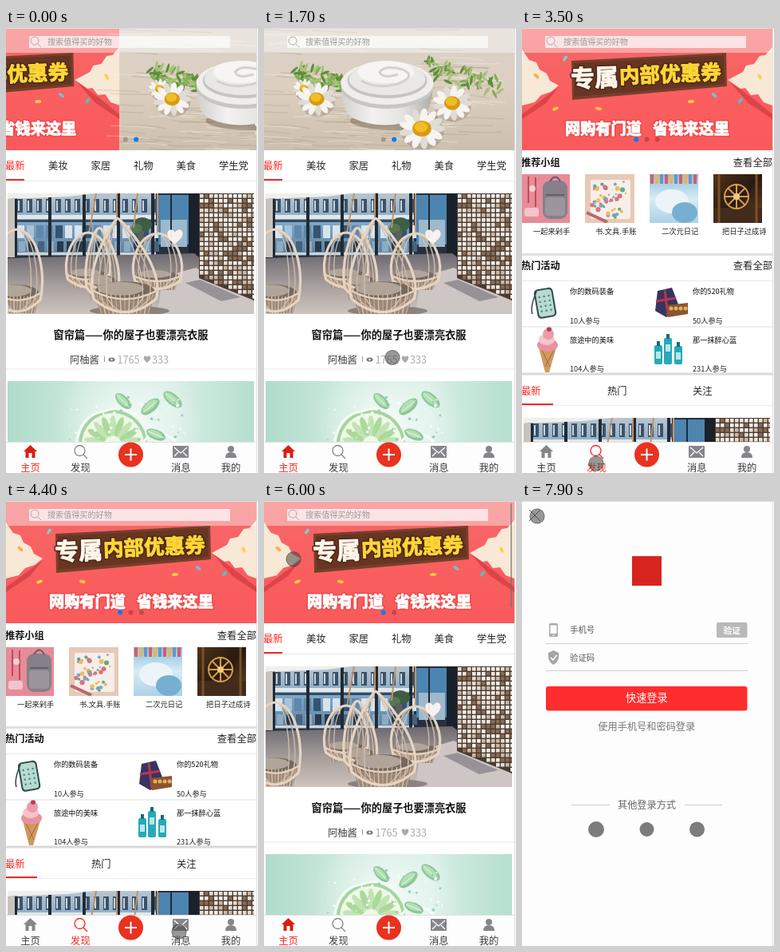
Write an HTML page with a canvas that moves like this. It is 316 px wide and 557 px high and loops after 8 s.

```html
<!DOCTYPE html>
<html lang="zh-CN">
<head>
<meta charset="utf-8">
<title>Shopping app</title>
<style>
html, body { margin: 0; width: 100%; height: 100%; overflow: hidden; background: #fff; }
canvas { display: block; width: 316px; height: 557px; }
</style>
</head>
<body>
<canvas id="stage"></canvas>
<script>
const W = 316, H = 557, LOOP = 8000, PW = 314;
const FONT = '"Noto Sans CJK SC", "Noto Sans CJK", "Noto Sans", sans-serif';
const RED = '#f8281e', INK = '#222', ICON = '#85858a';
const cv = document.getElementById('stage');
const dpr = window.devicePixelRatio || 1;
cv.width = W * dpr;
cv.height = H * dpr;
const c = cv.getContext('2d');

// ---- helpers ----
function rect(x, y, w, h, fill) {
  c.fillStyle = fill;
  c.fillRect(x, y, w, h);
}
function round(x, y, w, h, r, fill) {
  c.beginPath();
  c.roundRect(x, y, w, h, r);
  c.fillStyle = fill;
  c.fill();
}
function oval(x, y, rx, ry, fill, rot = 0) {
  c.beginPath();
  c.ellipse(x, y, rx, ry, rot, 0, 7);
  c.fillStyle = fill;
  c.fill();
}
const dot = (x, y, r, fill) => oval(x, y, r, r, fill);
function poly(d, fill) {
  c.fillStyle = fill;
  c.fill(new Path2D(d));
}
function line(d, color, w = 1) {
  c.strokeStyle = color;
  c.lineWidth = w;
  c.stroke(new Path2D(d));
}
function text(s, x, y, size, color = INK, weight = 400, align = 'left') {
  c.font = `${weight} ${size}px ${FONT}`;
  c.textAlign = align;
  c.textBaseline = 'middle';
  c.fillStyle = color;
  c.fillText(s, x, y);
}
function heavy(s, x, y, size, color, edge) {
  c.lineJoin = 'round';
  text(s, x, y, size, color, 900);
  c.strokeStyle = edge;
  c.lineWidth = 4;
  c.strokeText(s, x, y);
  c.strokeStyle = color;
  c.lineWidth = 1;
  c.strokeText(s, x, y);
  c.fillText(s, x, y);
  c.lineJoin = 'miter';
}
function grad(x0, y0, x1, y1, ...stops) {
  const g = c.createLinearGradient(x0, y0, x1, y1);
  stops.forEach((s, i) => g.addColorStop(i / (stops.length - 1), s));
  return g;
}
function clip(x, y, w, h, draw) {
  c.save();
  c.beginPath();
  c.rect(x, y, w, h);
  c.clip();
  draw();
  c.restore();
}
function shift(x, y, draw) {
  c.save();
  c.translate(x, y);
  draw();
  c.restore();
}
function seeded(seed) {
  return () => (seed = (seed * 16807) % 2147483647) / 2147483647;
}

// ---- banners ----
function couponBanner() {
  rect(0, 0, PW, 153, grad(0, 0, 0, 153, '#f4696a', '#fb5f60', '#f95a5b'));
  const paper = '#f8e8d6';
  poly('M0 108 L22 92 46 74 30 94 0 114Z M314 108 L292 90 259 66 284 94 314 114Z', '#dc4449');
  poly('M0 27 L9 40 18 43 22 52 31 57 35 66 46 72 36 80 24 84 16 93 0 97Z', paper);
  poly('M314 24 L305 34 298 35 291 45 281 47 277 55 258 65 274 76 280 75 287 84 296 83 303 93 314 97Z', paper);
  poly('M62 41 L256 31 257 73 63 90Z', '#75402c');
  poly('M65 44 L253 34 254 70 66 86Z', '#673521');
  c.save();
  c.translate(61, 63);
  c.rotate(-.04);
  heavy('专属', 0, 0, 30, '#fff7ea', '#4d2618');
  heavy('内部优惠券', 61, -1, 25.6, '#ffd735', '#4d2618');
  c.restore();
  heavy('网购有门道', 54, 126, 19.2, '#fff', '#f0484a');
  heavy('省钱来这里', 164, 126, 19.2, '#fff', '#f0484a');
  [[42, 101, '#ffcf3c'], [54, 38, '#7ad0c8'], [212, 92, '#ffcf3c'], [241, 84, '#6fc0d8'],
   [274, 91, '#5bbcc0'], [298, 61, '#ffd14a'], [96, 101, '#f8c042'], [18, 60, '#f8b04a']]
    .forEach(([x, y, f]) => oval(x, y, 2, 4, f, x));
}
function daisy(x, y, r) {
  oval(x + 1, y + 4, r * .95, r * .8, 'rgba(110,90,65,.25)');
  for (let i = 0; i < 13; i++) {
    const a = i * Math.PI / 6.5;
    oval(x + Math.cos(a) * r * .66, y + Math.sin(a) * r * .55, r * .37, r * .17, i % 3 ? '#f6f4f0' : '#dfdcd6', a);
  }
  oval(x, y, r * .42, r * .36, '#d99a12');
  oval(x - 1, y - 2, r * .3, r * .23, '#f0bd24');
}
// A bunch of fine leaves around a slanted stem.
function sprig(x, y, w, h, seed) {
  const r = seeded(seed);
  for (let i = 0; i < 55; i++) {
    const k = r();
    oval(x + k * w, y + k * h + (r() - .5) * 22, 6, 1.7, ['#5f8f3c', '#86ad58', '#a9c07c'][i % 3], r() * 3 - 1.5);
  }
}
function creamBanner() {
  rect(0, 0, PW, 153, grad(0, 0, 0, 153, '#d9d2c8', '#dccfc0', '#cdbfae'));
  const r = seeded(11);
  for (let i = 0; i < 110; i++) {
    const y = r() * 153, x = r() * 280 - 30;
    line(`M${x} ${y} q25 ${r() * 6 - 3} 55 ${r() * 4}`, i % 2 ? 'rgba(140,118,95,.2)' : 'rgba(255,248,238,.3)', 1.3);
  }
  sprig(38, 55, 60, 14, 3);
  sprig(206, 50, 90, 24, 8);
  oval(166, 116, 58, 12, 'rgba(95,75,55,.4)');
  poly('M97 72 Q97 105 112 113 Q150 130 196 113 Q211 104 212 70Z', grad(97, 0, 212, 0, '#d2d0cd', '#f3f2f0', '#e6e4e1', '#aeaaa5'));
  oval(154.5, 74, 58, 27, '#c9c6c2');
  oval(154.5, 69, 58, 27, '#efeeec');
  oval(154.5, 66, 50, 22, '#c4c4c3');
  oval(154.5, 64, 48, 20, '#e9e8e6');
  oval(153, 55, 36, 14, '#f6f5f4');
  line('M122 66 Q140 77 168 70 Q192 60 174 52 Q152 46 145 55 Q148 64 168 58', '#d2d2d1', 3);
  daisy(50, 76, 13);
  daisy(66, 89, 23);
  daisy(236, 94, 24);
  daisy(198, 126, 28);
}
function bannerArea(offset, n, active) {
  clip(0, 1, PW, 152, () => {
    if (offset < PW) shift(-offset, 0, couponBanner);
    if (offset > 0) shift(PW - offset, 0, creamBanner);
    rect(0, 1, PW, 30, 'rgba(255,255,255,.4)');
  });
  rect(29, 10, 252, 15, 'rgba(255,255,255,.7)');
  line('M41 16a5 5 0 1 1-10 0a5 5 0 1 1 10 0M40 20l4 4', '#aaa', 1);
  text('搜索值得买的好物', 52, 17, 10.1, '#9a9a9a');
  for (let i = 0; i < n; i++)
    dot(156.5 + (i - (n - 1) / 2) * 13.4, 139.5, 3, i === active ? '#087cf5' : 'rgba(0,0,0,.22)');
}

// ---- photos ----
// A hanging wicker chair; belly sets how far the sides bulge.
function chair(x, top, bot, w, belly, lean = 0) {
  const h = bot - top, seat = bot - h * .24, ax = x - lean;
  const shell = k => `M${ax} ${top} C${ax + w * belly * k} ${top + 2} ${x + w * .6 * k} ${top + h * .5} ${x + w * .47 * k} ${bot - h * .16} Q${x} ${bot + h * .12} ${x - w * .47 * k} ${bot - h * .16} C${x - w * .6 * k} ${top + h * .5} ${ax - w * belly * k} ${top + 2} ${ax} ${top}`;
  poly(`M${x - w * .47} ${seat} H${x + w * .47} L${x + w * .36} ${bot} H${x - w * .36}Z`, '#9a8779');
  oval(x, seat, w * .44, h * .1, '#75695f');
  oval(x - w * .06, seat - 3, w * .34, h * .07, '#b1a59a');
  for (let i = -6; i <= 6; i++)
    line(`M${x + i * w * .07} ${seat + 4} L${x + i * w * .058} ${bot}`, i % 2 ? '#d9c5b2' : '#c0a993', 1.4);
  line(shell(.78), '#cdb49d', 1.6);
  line(shell(.55), '#d8c3af', 1.2);
  line(shell(1), '#e6d4c2', 3.2);
  line(`M${x - w * .47} ${seat} Q${x} ${seat + h * .17} ${x + w * .47} ${seat}`, '#e2cfbc', 2.6);
}
function loungePhoto() {
  clip(2, 207, 309, 151, () => {
    const r = seeded(29);
    const pick = list => list[Math.floor(r() * list.length)];
    rect(2, 207, 309, 151, '#27303c');
    // street seen through the glass front
    rect(12, 207, 176, 78, grad(0, 207, 0, 285, '#b9c6cf', '#7fa5c4', '#5b7f9f'));
    for (let x = 14; x < 186; x += 12) {
      rect(x, 214, 7, 17, '#3e5267');
      rect(x + 1, 216, 2, 13, '#c8d6e0');
      rect(x, 247, 9, 16, pick(['#d7e4ec', '#5f88aa', '#345470', '#a7c3d7']));
      rect(x + 2, 267, 8, 13, pick(['#29394a', '#46637e', '#8dabc2']));
    }
    rect(12, 234, 176, 5, '#e3e7e8');
    rect(12, 240, 176, 3, '#334b63');
    rect(12, 281, 176, 3, '#cfd4d6');
    for (let i = 0; i < 5; i++) rect(10 + i * 43, 207, 4, 82, '#212a35');
    poly('M2 207 H110 L78 211 2 214Z', '#efefec');
    rect(2, 214, 9, 73, '#c8c3bd');
    rect(191, 209, 38, 62, '#4d84b0');
    rect(194, 240, 33, 34, '#9db9cb');
    rect(206, 207, 2, 72, '#1e2934');
    rect(229, 207, 13, 111, '#1a212b');
    // floor
    poly('M2 288 L236 282 311 342 311 358 2 358Z', grad(0, 283, 0, 358, '#6d6a70', '#a59d9c', '#cfc3bc'));
    poly('M196 312 L238 300 311 341 311 358 190 358Z', '#cdc6c4');
    poly('M225 319 L243 315 294 337 270 342Z', '#989197');
    oval(171, 246, 12, 9, '#3f5d43');
    oval(164, 251, 7, 6, '#567651');
    rect(165, 254, 8, 28, '#5a6159');
    // tiled wall
    poly('M242 207 H311 V341 L242 313Z', '#4a3a31');
    for (let x = 243; x < 311; x += 6)
      for (let y = 208; y < 309 + (x - 242) * .4; y += 6)
        rect(x, y, 4.6, 4.6, pick(['#f6f0e9', '#e6dccf', '#c9b7a4', '#846a55', '#f0e8de']));
    oval(155, 354, 50, 6, 'rgba(60,52,52,.45)');
    line('M139 207V240M113 207L104 257M165 207L160 250M190 207V258', '#c39468', 2);
    chair(103, 256, 326, 54, .4);
    chair(190, 257, 328, 60, .4);
    chair(14, 252, 357, 62, .4);
    chair(121, 250, 340, 42, .2, 4);
    chair(149, 238, 358, 84, .06, 9);
    poly('M212 270 C193 257 207 247 212 256 C217 247 231 257 212 270', 'rgba(255,246,244,.93)');
  });
}
function leaf(x, y, rot, s) {
  oval(x, y, 14 * s, 7 * s, '#8cc896', rot);
  oval(x - 1, y - 1, 11 * s, 4.5 * s, '#b3dfb4', rot);
  const dx = Math.cos(rot) * 12 * s, dy = Math.sin(rot) * 12 * s;
  line(`M${x - dx} ${y - dy}L${x + dx} ${y + dy}`, '#e9f7ea', 1);
}
function limePhoto() {
  clip(2, 442, 309, 80, () => {
    rect(2, 442, 309, 80, grad(2, 0, 311, 0, '#b0dbcb', '#cdeade', '#d7eee5', '#b5dfcf'));
    const g = c.createRadialGradient(155, 498, 5, 155, 498, 95);
    g.addColorStop(0, 'rgba(255,255,255,.75)');
    g.addColorStop(1, 'rgba(255,255,255,0)');
    rect(2, 442, 309, 80, g);
    dot(134, 521, 43, '#a4d59f');
    dot(134, 521, 39, '#eef8e6');
    for (let i = 0; i < 9; i++) {
      const a = Math.PI + (i + .5) * Math.PI / 9;
      oval(134 + Math.cos(a) * 23, 521 + Math.sin(a) * 23, 13, 4.2, i % 2 ? '#abd99c' : '#c2e4b3', a);
    }
    line('M88 521Q93 484 122 480Q150 470 168 489M171 521Q183 498 206 512L216 521', '#f3fcf7', 3);
    leaf(147, 467, .8, .9);
    leaf(181, 474, -.7, 1);
    leaf(209, 465, .7, 1);
    leaf(188, 509, .4, .9);
    const r = seeded(7);
    for (let i = 0; i < 50; i++) dot(80 + r() * 150, 462 + r() * 58, .5 + r() * 1.4, i % 3 ? '#f5fffa' : '#9bcfbb');
  });
}

// ---- shared parts ----
function frame(bg) {
  rect(0, 0, W, H, '#fff');
  rect(0, 0, PW, H, bg);
}
function edges() {
  rect(0, 0, W, 1, '#ddd');
  rect(314, 0, 1, H, '#dedede');
}
function nav(active) {
  rect(0, 519, PW, 38, '#fdfdfd');
  rect(0, 518, PW, 1, '#e2e2e2');
  const col = i => i === active ? RED : ICON;
  poly('M30.5 522 L39 530 H36.5 V538 H32.5 V532 H28.5 V538 H24.5 V530 H22Z', active === 0 ? '#d91e13' : ICON);
  line('M99 529a6.5 6.5 0 1 1-13 0a6.5 6.5 0 1 1 13 0M97 534l5 5', col(1), 1.3);
  dot(156.5, 534, 15.5, '#e9321f');
  line('M149 534H164M156.5 526.5V541.5', '#fff', 2);
  round(209, 523, 20, 15, 1, ICON);
  line('M211 525L219 532L227 525M211 536L216 531M227 536L222 531', '#fff', 1.3);
  dot(282, 527, 4, ICON);
  poly('M275 538 Q275 531 282 531 Q289 531 289 538Z', ICON);
  ['主页', '发现', 0, '消息', '我的'].forEach((s, i) => {
    if (s) text(s, 30.5 + i * 62.9, 550.3, 12.3, i === active ? RED : '#3b3b3b', 400, 'center');
  });
}
function scrollbar(h, alpha) {
  if (alpha > 0) rect(309, 3, 2, h, `rgba(110,110,110,${.6 * alpha})`);
}

// ---- pages ----
function home(offset, active, bar) {
  frame('#fff');
  bannerArea(offset, 2, active);
  ['最新', '美妆', '家居', '礼物', '美食', '学生党'].forEach((s, i) =>
    text(s, i * 53.5 - (i ? .5 : 1), 172.5, 12.3, i ? INK : RED));
  rect(0, 191, PW, 1, '#e8e8e8');
  rect(0, 189, 23, 2, RED);
  loungePhoto();
  text('窗帘篇——你的屋子也要漂亮衣服', 156.5, 384, 13.2, '#111', 700, 'center');
  text('阿柚酱', 80, 415, 12.3, '#444');
  rect(123, 411, 1, 7, '#999');
  oval(132.5, 415, 4, 2.6, '#777');
  dot(132.5, 415, 1.2, '#fff');
  text('1765', 139.5, 415, 12.7, '#aaa');
  poly('M177 419 C169 413 174 408 177 412 C180 408 185 413 177 419', '#aaa');
  text('333', 183, 415, 12.7, '#aaa');
  rect(0, 426.5, PW, 1, '#e9e9e9');
  limePhoto();
  nav(0);
  scrollbar(130, bar);
  edges();
}

function groupPics(first) {
  if (first) clip(0, 183, 60, 61, () => {
    rect(0, 183, 60, 61, '#e68c98');
    round(26, 191, 31, 48, 9, '#858089');
    round(29, 212, 25, 23, 4, '#9b959d');
    line('M30 209H53M35 192Q42 181 48 192', '#625e69', 2);
    line('M8 186V219M17 187V224', '#c3495a', 2);
    round(3, 225, 18, 11, 3, '#f2c5c9');
    dot(13, 201, 4, '#f4d0cf');
  });
  clip(79, 183, 62, 61, () => {
    rect(79, 183, 62, 61, '#e7c9b6');
    round(86, 190, 50, 49, 2, '#f5eee9');
    const r = seeded(5), tones = ['#dc7180', '#65a58b', '#eebb60', '#7da8bd'];
    for (let i = 0; i < 45; i++) dot(88 + r() * 46, 192 + r() * 45, 1 + r() * 2.2, tones[i % 4]);
    line('M81 231L107 243', '#bb6771', 4);
  });
  clip(160, 183, 61, 61, () => {
    rect(160, 183, 61, 61, grad(160, 183, 160, 244, '#8bbedf', '#d8ecf5', '#acd1e6'));
    for (let i = 0; i < 10; i++) rect(161 + i * 6, 183, 4, 12, ['#d45d69', '#e9b357', '#6796c7'][i % 3]);
    oval(188, 217, 21, 15, '#edf4f8');
    oval(204, 231, 16, 13, '#77afd2');
  });
  clip(240, 183, 61, 61, () => {
    rect(240, 183, 61, 61, grad(240, 183, 301, 244, '#513218', '#281a12', '#694525'));
    rect(240, 225, 61, 19, '#422b1c');
    line('M284 211a15 15 0 1 1-30 0a15 15 0 1 1 30 0M254 211H284M269 196V226M258 200L280 222M280 200L258 222', '#d69d46', 2);
    dot(269, 211, 4, '#f3cb78');
    line('M247 183V244M294 183V244', '#795027', 3);
  });
}
function activityPics() {
  c.save();
  c.translate(28, 344);
  c.rotate(-.17);
  round(-11, -18, 24, 37, 5, '#304d4d');
  round(-9, -16, 20, 33, 4, '#b7dbcf');
  for (let i = 0; i < 12; i++) dot(-5 + i % 3 * 6, -8 + Math.floor(i / 3) * 6, 1.2, '#4d7d79');
  c.restore();
  line('M18 330Q10 349 13 358', '#344', 1.5);
  poly('M170 329 L188 325 198 351 181 362 167 354Z', '#353463');
  line('M179 328L183 360M168 342L193 338', '#b7364b', 3);
  poly('M181 347 L208 344 208 358 183 362Z', '#8e5330');
  for (let i = 0; i < 4; i++) dot(187 + i * 6, 351, 2.5, '#ddb265');
  poly('M21 400 L43 400 34 431 29 431Z', '#cd9b5c');
  line('M25 403L35 424M40 403L29 424', '#a56c37');
  oval(32, 397, 13, 8, '#e791a2');
  oval(31, 390, 10, 7, '#f6c4c9');
  oval(33, 383, 7, 7, '#eb9ba9');
  dot(34, 377, 3, '#b83e52');
  [[166, 397], [178, 388], [191, 398]].forEach(([x, y]) => {
    round(x, y, 10, 421 - y, 2, '#26a9b9');
    rect(x + 3, y - 5, 4, 6, '#176b7c');
    rect(x + 2, y + 8, 6, 9, '#b9e8e6');
  });
}
function discover(first, bar) {
  frame('#fff');
  bannerArea(0, 3, 0);
  const head = (s, y) => {
    text(s, -1, y, 12.2, '#111', 700);
    text('查看全部', 314, y, 12.3, INK, 400, 'right');
  };
  head('推荐小组', 168.5);
  groupPics(first);
  ['一起来剁手', '书.文具.手账', '二次元日记', '把日子过成诗'].forEach((s, i) =>
    text(s, [14, 92, 175, 251][i], 254, 9.25));
  rect(0, 282, PW, 3, '#dce2e0');
  head('热门活动', 297.5);
  rect(0, 316, PW, 1, '#e8e8e8');
  activityPics();
  [['你的数码装备', 10], ['你的520礼物', 50], ['旅途中的美味', 104], ['那一抹醉心蓝', 231]].forEach(([s, n], i) => {
    const x = i % 2 ? 214 : 60, y = i < 2 ? 330 : 390.5;
    text(s, x, y, 9.2, '#111', 500);
    text(n + '人参与', x, y + 36.5, 9.2);
  });
  rect(0, 373.5, PW, 1, '#dedede');
  rect(0, 431.5, PW, 3, '#dadada');
  ['最新', '热门', '关注'].forEach((s, i) => text(s, i * 107 - (i ? 0 : 1), 454, 12.3, i ? INK : RED));
  rect(0, 472, PW, 1, '#eee');
  rect(0, 470, 39, 2, RED);
  shift(0, 281, loungePhoto);
  nav(1);
  scrollbar(253, bar);
  edges();
}

function login() {
  frame('#fdfdfd');
  line('M9 11L23 25M23 11L9 25', '#555', 1);
  rect(138, 69, 37, 37, '#d8241f');
  round(34, 153, 11, 17, 1.5, '#aaa');
  rect(35.5, 155.5, 8, 10.5, '#fff');
  dot(39.5, 168, 1, '#fff');
  text('手机号', 60, 161.5, 10.4, '#555');
  round(244, 152, 38.5, 19, 2, '#b9b9b9');
  text('验证', 263.3, 162, 10.7, '#fff', 700, 'center');
  rect(30, 178, 253, 1, '#cfcfcf');
  poly('M39.5 187 L46 190 V196 Q45 202 39.5 205 Q34 202 33 196 V190Z', '#a5a5a5');
  line('M36 196L39 199L43.5 193', '#fff', 1.5);
  text('验证码', 60, 196, 10.4, '#555');
  rect(30, 212, 253, 1, '#cfcfcf');
  round(30, 232, 252.5, 30.5, 3, '#ff2d2d');
  text('快速登录', 156.3, 246.5, 13.1, '#fff', 500, 'center');
  text('使用手机号和密码登录', 156.3, 282, 12.2, '#777', 400, 'center');
  rect(62, 380, 48, 1, '#ccc');
  rect(204, 380, 47, 1, '#ccc');
  text('其他登录方式', 156.5, 380.5, 12.2, '#666', 400, 'center');
  [[93, 10], [156.5, 9], [219.5, 9.5]].forEach(([x, r]) => dot(x, 411, r, '#7c7c7c'));
  edges();
}

// ---- touch pointer: time, x, y ----
const PATH = [
  [600, 127, 306], [800, 127, 308], [1200, 127, 308], [1500, 145, 368], [1700, 161, 412],
  [1850, 172, 480], [1950, 154, 538], [2100, 110, 543], [2200, 99, 545], [2500, 93, 545],
  [3600, 93, 545], [3800, 130, 541], [4100, 241, 542], [4200, 241, 542], [4400, 217, 539],
  [4700, 217, 539], [5000, 140, 250], [5200, 60, 42], [5300, 9, 23], [5900, 9, 23],
  [6300, 120, 220], [6600, 240, 470], [6800, 286, 545], [6900, 288, 553], [7300, 288, 553],
  [7600, 155, 260], [7800, 50, 55], [7900, 19, 19], [8000, 19, 19]
];
function pointer(t) {
  if (t < PATH[0][0]) return;
  const i = PATH.findIndex(p => p[0] > t), [t0, x0, y0] = PATH[i - 1], [t1, x1, y1] = PATH[i];
  const k = (t - t0) / (t1 - t0), x = x0 + (x1 - x0) * k, y = y0 + (y1 - y0) * k;
  dot(x, y, 9.5, 'rgba(70,70,70,.55)');
  c.beginPath();
  c.arc(x, y, 9, 0, 7);
  c.strokeStyle = 'rgba(50,50,50,.35)';
  c.lineWidth = 1;
  c.stroke();
}

const fade = (t, from, to) => Math.min(1, Math.max(0, (to - t) / (to - from)));

function draw(t) {
  c.setTransform(dpr, 0, 0, dpr, 0, 0);
  if (t < 2800) home(PW - 143 * Math.pow(fade(t, 0, 550), 2.5), 1, 0);
  else if (t < 4600) discover(t >= 3000, fade(t, 3150, 3500));
  else if (t < 5800) login();
  else if (t < 7200) home(0, 0, fade(t, 6100, 6500));
  else login();
  pointer(t);
}

const start = performance.now();
function tick() {
  draw((performance.now() - start) % LOOP);
  requestAnimationFrame(tick);
}
tick();
</script>
</body>
</html>
```
